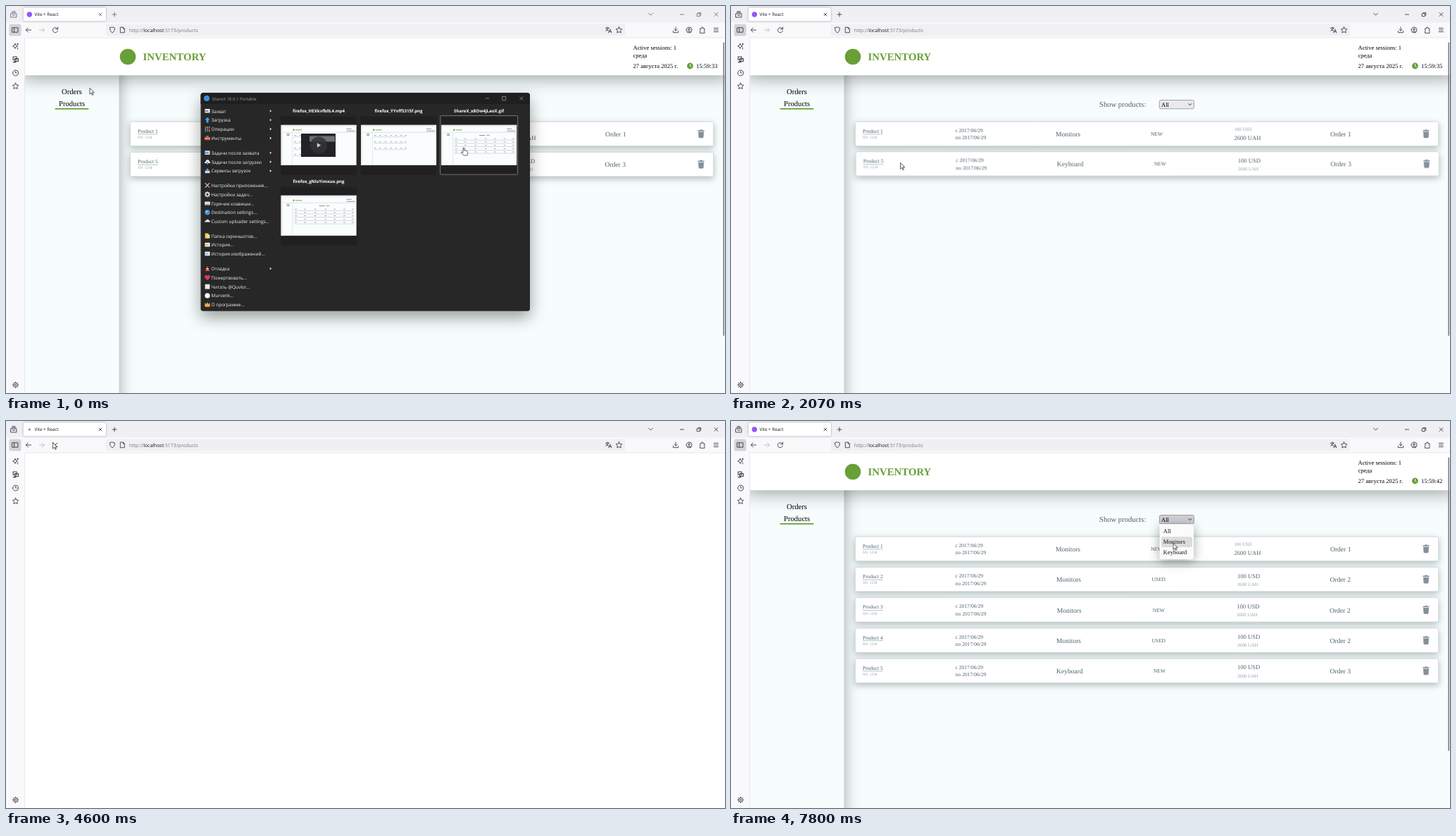
An HTML page that plays this animation: 1021x549 px, repeating every 8000 ms.

```html
<!DOCTYPE html>
<html lang="en">
<head>
<meta charset="utf-8">
<title>Inventory products</title>
<style>
html, body { margin: 0; width: 100%; height: 100%; overflow: hidden; background: #fff; }
svg { display: block; width: 100%; height: 100%; }
text { text-rendering: geometricPrecision; white-space: pre; }
.serif { font-family: "Liberation Serif", "Times New Roman", serif; }
.sans { font-family: "Open Sans", "Noto Sans", sans-serif; }
.line { fill: none; stroke: #3d3c46; stroke-width: .9; stroke-linecap: round; stroke-linejoin: round; }
.header { filter: drop-shadow(0 2px 14px rgba(0,0,0,.42)); }
.nav { filter: drop-shadow(2px 0 10px rgba(0,0,0,.3)); }
.card { filter: drop-shadow(0 3px 5px rgba(60,75,75,.36)); }
.popup { filter: drop-shadow(0 3px 8px rgba(0,0,0,.35)); }
.window { filter: drop-shadow(0 9px 11px rgba(0,0,0,.38)); }
.tab { filter: drop-shadow(0 0 1.2px rgba(0,0,0,.4)); }

/* one shared 8 s timeline: 1% = 80 ms */
.a { animation: 8s linear infinite; }
.step { animation-timing-function: step-end; }

#cursor { animation-name: cursor; animation-timing-function: ease-in-out; }
@keyframes cursor {
  0%, .2% { transform: translate(118.5px, 116px); }
  3.375%, 6% { transform: translate(266px, 145px); }
  16.625%, 20.5% { transform: translate(680px, 135px); }
  25.9%, 30.4% { transform: translate(240px, 222px); }
  34.1% { transform: translate(183px, 205px); }
  35% { transform: translate(177.5px, 172px); }
  38%, 41% { transform: translate(192px, 182px); }
  46.625% { transform: translate(89.8px, 57px); }
  50%, 64.4% { transform: translate(66px, 30px); }
  67.5%, 70.1% { transform: translate(303px, 152px); }
  70.875% { transform: translate(358.3px, 149px); }
  72.5%, 75.2% { transform: translate(559px, 146px); }
  80%, 89.4% { transform: translate(625px, 138px); }
  97.5%, 100% { transform: translate(627.5px, 173px); }
}
#window { animation-name: minimize; }
@keyframes minimize {
  0%, 18.6% { transform: none; opacity: 1; animation-timing-function: ease-in; }
  19.95%, 20.82% { transform: translate(305.4px, 272.4px) scale(.505); opacity: 1; }
  20.83%, 100% { transform: translate(305.4px, 272.4px) scale(.505); opacity: 0; }
}
#strip { animation-name: focus; }
@keyframes focus { 0% { opacity: .72; } 19.125%, 100% { opacity: 1; } }

#first { animation-name: first; animation-timing-function: ease; }
@keyframes first {
  0%, 22.9% { transform: none; }
  24.4% { transform: translate(.8px, -.8px); }
  26.5%, 34.4% { transform: none; }
  38.1%, 41.7% { transform: translate(2px, -2px); }
  45.4%, 100% { transform: none; }
}
#last { animation-name: last; animation-timing-function: ease; }
@keyframes last {
  0%, 25% { transform: none; }
  29%, 34.4% { transform: translate(2px, -2px); }
  38.1%, 100% { transform: none; }
}
#before { animation-name: before; }
@keyframes before { 0% { opacity: 1; } 57.5%, 100% { opacity: 0; } }
#after { animation-name: after; }
@keyframes after { 0% { opacity: 0; } 58.375%, 100% { opacity: 1; } }
#blank { animation-name: blank; }
@keyframes blank { 0% { opacity: 0; } 57.5% { opacity: 1; } 58.375%, 100% { opacity: 0; } }

.idle { animation-name: idle; }
.busy { animation-name: busy; }
@keyframes idle { 0% { opacity: 1; } 55.875% { opacity: 0; } 60%, 100% { opacity: 1; } }
@keyframes busy { 0% { opacity: 0; } 55.875% { opacity: 1; } 60%, 100% { opacity: 0; } }
#reload { animation-name: reload; }
@keyframes reload {
  0% { fill: transparent; }
  49.1% { fill: #e0e0e6; }
  52.5% { fill: #cdcdd5; }
  55.875%, 100% { fill: transparent; }
}
#select { animation-name: select; }
@keyframes select {
  0% { fill: #e9e9ed; }
  78% { fill: #d0d0d7; }
  83.375% { fill: #b1b1b9; }
  86.625%, 100% { fill: #d0d0d7; }
}
#popup { animation-name: popup; }
@keyframes popup { 0% { opacity: 0; } 83.375%, 100% { opacity: 1; } }
#mark { animation-name: mark; }
@keyframes mark { 0% { transform: translateY(-15.2px); } 95%, 100% { transform: none; } }

#ticks { animation-name: ticks; }
@keyframes ticks {
  0% { transform: none; }
  2.5% { transform: translateY(-20px); }
  15% { transform: translateY(-40px); }
  27.5% { transform: translateY(-60px); }
  40% { transform: translateY(-80px); }
  52.5% { transform: translateY(-100px); }
  58.375% { transform: translateY(-120px); }
  70.875% { transform: translateY(-140px); }
  83.375% { transform: translateY(-160px); }
  95.875%, 100% { transform: translateY(-180px); }
}
</style>
</head>
<body>
<svg id="stage" viewBox="0 0 1021 549" preserveAspectRatio="none"></svg>
<script>
const GREEN = '#689f38', SLATE = '#4e626c', PALE = '#8fa2ab';

const text = (x, y, size, fill, str, more = '') =>
  `<text x="${x}" y="${y}" font-size="${size}" fill="${fill}" ${more}>${str}</text>`;
const rect = (x, y, w, h, fill, more = '') =>
  `<rect x="${x}" y="${y}" width="${w}" height="${h}" fill="${fill}" ${more}/>`;
const dot = (x, y, r, fill, more = '') =>
  `<circle cx="${x}" cy="${y}" r="${r}" fill="${fill}" ${more}/>`;
const line = (d, more = '') => `<path class="line" d="${d}" ${more}/>`;
const at = (x, y, body, more = '') => `<g transform="translate(${x} ${y})" ${more}>${body}</g>`;

// ---- page ----
const trash = `<path fill="#84919a" d="M-4.6-5.2h2.6l.8-.9h2.4l.8.9h2.6v1.5h-9.2zM-4-2.9h8l-.5 7.6q-.1 1.1-1.1 1.1h-4.8q-1 0-1.1-1.1z"/>`;

// x positions: date, type, state, price, order
function card(n, slot, type, state, order, xs, id = '') {
  const [date, kind, cond, price, ord] = xs;
  const y = 164.2 + slot * 43.25;
  const prices = n === 1
    ? text(price, 13, 6.75, PALE, '100 USD') + text(price, 26, 8.6, SLATE, '2600 UAH')
    : text(price, 15.2, 8.6, SLATE, '100 USD') + text(price, 26.4, 6.65, PALE, '2600 UAH');
  return at(0, y, `<g ${id && `id="${id}" class="a"`}>
    ${rect(176.5, 0, 828, 34.3, '#fff', 'rx="2" class="card" stroke="#ccd8db" stroke-width=".8"')}
    ${text(187, 15.8, 7.45, SLATE, 'Product ' + n)}
    ${rect(187, 17.4, 28.8, .6, '#8a9aa2')}
    ${text(187, 24, 5.4, PALE, 'SN: 1234')}
    ${text(date, 14.7, 7.5, SLATE, 'с 2017/06/29')}
    ${text(date, 25.1, 7.5, SLATE, 'по 2017/06/29')}
    ${text(kind, 20.9, 9.57, SLATE, type)}
    ${text(cond, 20, 7.45, SLATE, state)}
    ${prices}
    ${text(ord, 20.9, 9.57, SLATE, 'Order ' + order)}
    ${at(987, 17.2, trash)}</g>`);
}
const xsFirst = [318.4, 461, 596, 714.4, 851];
const xsMid = [318.6, 462, 597.4, 719, 850.5];
const xsThird = [318.8, 462.7, 598.8, 718.2, 850];
const xsLast = [318.6, 462, 600, 719, 850.5];
const before = card(1, 0, 'Monitors', 'NEW', 1, xsFirst, 'first') + card(5, 1, 'Keyboard', 'NEW', 3, xsLast, 'last');
const after = card(1, 0, 'Monitors', 'NEW', 1, xsFirst) + card(2, 1, 'Monitors', 'USED', 2, xsMid) +
  card(3, 2, 'Monitors', 'NEW', 2, xsThird) + card(4, 3, 'Monitors', 'USED', 2, xsMid) +
  card(5, 4, 'Keyboard', 'NEW', 3, xsLast);

const clock = Array.from({ length: 10 }, (_, i) =>
  text(0, 10 + i * 20, 8.51, '#000', '15:59:' + (33 + i))).join('');

const page = `<g class="serif">
  ${rect(27, 45, 994, 504, '#f6fdfc')}
  ${rect(27, 45, 133.5, 520, '#f6fdfc', 'class="nav"')}
  ${text(79, 124.6, 10.64, '#000', 'Orders')}
  ${text(75, 142.3, 10.64, '#000', 'Products')}
  ${rect(69.5, 145, 48, 1.8, GREEN, 'rx=".9"')}
  ${text(523, 143.3, 10.64, SLATE, 'Show products:')}
  ${rect(608.4, 133.5, 49, 12.3, '#e9e9ed', 'id="select" class="a step" rx="2" stroke="#8f8f9d" stroke-width=".8"')}
  ${text(611, 142.6, 8.6, '#000', 'All')}
  ${line('M649.8 138.7l2 2 2-2', 'style="stroke:#111"')}
  <g id="before" class="a step">${before}</g>
  <g id="after" class="a step">${after}</g>
  ${rect(20, 35, 1010, 63.3, '#fff', 'class="header"')}
  ${dot(173, 72, 11.3, GREEN)}
  ${text(194.6, 77, 14.8, GREEN, 'INVENTORY', 'font-weight="700"')}
  ${text(890.6, 62, 8.51, '#000', 'Active sessions: 1')}
  ${text(890.6, 72.8, 8.51, '#000', 'среда')}
  ${text(890.6, 88, 8.51, '#000', '27 августа 2025 г.')}
  ${dot(971.4, 85, 4.4, GREEN)}
  ${line('M971.4 82.4v2.8l1.8 1', 'style="stroke:#fff"')}
  <svg x="980" y="78" width="36" height="14" overflow="hidden"><g id="ticks" class="a step">${clock}</g></svg>
  ${rect(1018.3, 51.5, 1.8, 416.5, '#85858b', 'rx=".9"')}
  <g id="popup" class="a step">
    ${rect(608.6, 146.3, 48.4, 50, '#fbfbfc', 'rx="3" class="popup"')}
    ${rect(611, 164.2, 44, 14.8, '#dcdcdf', 'id="mark" class="a step" rx="2"')}
    ${text(613.8, 159, 8.51, '#111', 'All')}
    ${text(613.8, 174.2, 8.51, '#111', 'Monitors')}
    ${text(613.8, 189.2, 8.51, '#111', 'Keyboard')}
  </g>
  ${rect(27, 45, 994, 504, '#fff', 'id="blank" class="a step"')}
</g>`;

// ---- browser frame ----
const star = 'M0-4.3l1.3 2.8 3 .4-2.2 2.1.6 3L0 2.6-2.7 4l.6-3-2.2-2.1 3-.4z';
const clockIcon = 'M-4 0a4 4 0 1 0 8 0a4 4 0 1 0-8 0M0-2.3V0h1.6';
const spokes = Array.from({ length: 8 }, (_, i) => {
  const a = i * Math.PI / 4, c = Math.cos(a), s = Math.sin(a);
  return `M${3 * c} ${3 * s}L${4.2 * c} ${4.2 * s}`;
}).join('');
const icon = (x, y, d, more) => at(x, y, line(d, more));

const chrome = `<g class="sans">
  ${rect(0, 0, 1021, 24, '#f0f0f4')}
  ${rect(0, 23.5, 1021, 21.7, '#f9f9fb')}
  ${rect(0, 45, 27, 504, '#f9f9fb')}
  ${rect(26.4, 45, .6, 504, '#dcdce0')}
  ${rect(27, 44.7, 994, .6, '#dcdce0')}
  ${rect(24.6, 2.2, 117.4, 19.4, '#fff', 'rx="2.4" class="tab"')}
  ${dot(33.3, 12, 3.7, '#9556f5', 'class="a step idle"')}
  ${dot(33.3, 12, 1.6, '#8a8a94', 'class="a step busy"')}
  ${text(40.4, 14.3, 6.3, '#15141a', 'Vite + React')}
  <g id="strip" class="a step">
    ${icon(11, 12, 'M-4-1h8v5h-8zM-3-2.7h6M-2-4.3h4M-1.3 1.4h2.6')}
    ${icon(134, 12, 'M-1.9-1.9l3.8 3.8M1.9-1.9l-3.8 3.8')}
    ${icon(154, 12, 'M-3 0h6M0-3v6')}
    ${icon(915.5, 11.5, 'M-3-1.4l3 3 3-3')}
    ${icon(960, 12, 'M-2.6 0h5.2')}
    ${icon(984, 12, 'M-2.5-1.2h3.8v3.8h-3.8zM-1.1-2.5h3.8v3.8')}
    ${icon(1008.5, 12, 'M-2.5-2.5l5 5M2.5-2.5l-5 5')}
  </g>
  ${rect(4.5, 25.8, 17, 16.6, '#d2d2d8', 'rx="2.2"')}
  ${icon(13, 34, 'M-4-3.2h8v6.4h-8zM-1.4-3.2v6.4')}
  ${icon(32, 34, 'M3.6 0h-7.2M-.6-3.1L-3.7 0l3.1 3.1')}
  ${icon(51, 34, 'M-3.6 0h7.2M.6-3.1L3.7 0 .6 3.1', 'style="stroke:#bdbdc4"')}
  ${rect(61.5, 25.8, 17, 16.6, 'transparent', 'id="reload" class="a step" rx="2.2"')}
  <g class="a step idle">${icon(70, 34, 'M3.3-1.3a3.6 3.6 0 1 0 .2 2.5M3.6-4v2.9h-2.9')}</g>
  <g class="a step busy">${icon(70, 34, 'M-3-3l6 6M3-3l-6 6')}</g>
  ${rect(142, 25.8, 737, 16.6, '#f0f0f4', 'rx="2.2"')}
  ${icon(151, 34, 'M0-4l3.6 1.2q0 5-3.6 7q-3.600-2-3.600-7z')}
  ${icon(165.5, 34, 'M-2.8-3.800h3.600l2 2v5.600h-5.600zM.8-3.800v2h2')}
  ${text(175, 36.8, 6.9, '#76757f', 'http://<tspan fill="#15141a">localhost</tspan>:5173/products')}
  ${icon(855.5, 34, 'M-4-2.800h5M-1.500-4v1.200M.2-2.800q-1 3-4 4.200M-3-1.500q1 2 3 2.700M.3 4l2-5 2 5M1 2.500h2.600')}
  ${icon(870.5, 34, star)}
  ${icon(951, 34, 'M0-4v5M-2.200-1L0 1.200 2.200-1M-3.600 1.500v2.200h7.200v-2.200')}
  ${icon(970, 34, 'M-4 0a4 4 0 1 0 8 0a4 4 0 1 0-8 0M-1.300-.9a1.300 1.300 0 1 0 2.600 0a1.300 1.300 0 1 0-2.600 0M-2.500 2.900q2.500-2.500 5 0')}
  ${icon(989, 34, 'M-3.500 4v-2.200q1.800-.8 0-2v-1.800h2.200q-.6-2.200 1-2.200t1 2.200h2.300v2.200q-2 .6 0 2.200v1.600z')}
  ${icon(1008.3, 34, 'M-3-2.600h6M-3 0h6M-3 2.600h6')}
  ${icon(13.6, 57, 'M-.6-3.400q.5 2.900 3.400 3.400q-2.900.5-3.400 3.400q-.5-2.900-3.400-3.400q2.900-.5 3.400-3.400M3-4v2M2-3h2M3 2.200v1.800')}
  ${icon(13.6, 76, 'M-3.500-4h5v4.200h-5zM-1-1.500h4.800v4h-4.800zM-3.500 3.600h4', 'style="stroke-width:1.1"')}
  ${icon(13.6, 95, clockIcon)}
  ${icon(13.6, 113.5, star)}
  ${icon(13.6, 537.5, 'M-3 0a3 3 0 1 0 6 0a3 3 0 1 0-6 0M-1.100 0a1.100 1.100 0 1 0 2.200 0a1.100 1.100 0 1 0-2.200 0' + spokes)}
</g>`;

// ---- capture tool window ----
const box = (c, c2 = '#eee') => rect(-3.6, -3, 7.2, 5.6, c2, 'rx=".6"') + rect(-3.600, -1, 5, 2, c);
const glyph = {
  shot: box('#7b8ca3'),
  up: '<path fill="#4aa3ee" d="M0-4l3.600 3.800h-2.100v4h-3v-4h-2.100z"/>',
  grid: [-2.7, 0, 2.7].map((y, r) => [-2.7, 0, 2.7].map((x, c) =>
    rect(x - .9, y - .9, 1.8, 1.8, ['#e25b4a', '#7fc65a', '#5aa7e8'][(r + c) % 3])).join('')).join(''),
  tools: rect(-4, -1.6, 8, 4.4, '#d8433b', 'rx=".8"') + rect(-1.6, -3, 3.2, 1.2, '#bbb') + rect(-4, .2, 8, .8, '#eee'),
  after: box('#4a93d9', '#cfd9e4'),
  cloud: '<path fill="#e6e9ee" d="M-4 1.800q-.2-2 1.600-2.400q.5-2.600 2.800-2.400q2 .1 2.300 2.200q1.600.4 1.400 2.600z"/>' + rect(-1, 0, 2, 3.4, '#58a5e6'),
  host: rect(-3.4, .2, 6.8, 3, '#d7dde5') + '<path fill="#4aa3ee" d="M0-4l3 4h-6z"/>',
  cross: '<path stroke="#ccc" stroke-width="1.200" d="M-3.200-3.200l6.400 6.400M3.200-3.200l-6.400 6.400"/>' + rect(1.6, 1.6, 2, 2, '#d8433b'),
  gear: `<path stroke="#ddd" stroke-width="1.300" d="${spokes}"/><circle r="2.300" fill="none" stroke="#ddd" stroke-width="1.600"/>`,
  keys: rect(-3.8, -2.6, 7.6, 5.2, '#e4e4e4', 'rx=".8"') + rect(-2.4, .8, 4.8, 1, '#888'),
  globe: dot(0, 0, 3.7, '#3f93dc') + dot(-1, -1, 1.3, '#9fd0f5'),
  puff: '<path fill="#e6e9ee" d="M-4 1q0-2 1.800-2.200q1-2 2.800-1.600q1.600.3 1.800 1.800q1.800.2 1.600 2z"/>',
  folder: rect(-3.4, -3.6, 5, 7.2, '#f0c95a') + rect(-.6, -1.6, 4, 5, '#f6dd8d'),
  hist: box('#e0b64c', '#f3efe2'),
  pics: box('#8db8dc', '#eeeeee'),
  cone: '<path fill="#e2553d" d="M0-4l3 7.600h-6z"/>' + rect(-1.7, -.4, 3.4, 1.1, '#fff'),
  heart: '<path fill="#e03a4e" d="M0 3.600q-4-3-4-5q.2-2.200 2.200-2.200q1.200 0 1.800 1.200q.6-1.200 1.800-1.200q2 0 2.200 2.200q0 2-4 5z"/>',
  square: rect(-3.4, -3.4, 6.8, 6.8, '#e8e8e8'),
  disc: dot(0, 0, 3.6, '#fff'),
  crown: '<path fill="#edb23e" d="M-3.600-2.600l2 1.800 1.600-2.600 1.600 2.600 2-1.800v5.600h-7.200z"/>',
};
const groups = [
  [149, ['shot', 'Захват', 1], ['up', 'Загрузка', 1], ['grid', 'Операции', 1], ['tools', 'Инструменты', 1]],
  [208.3, ['after', 'Задачи после захвата', 1], ['cloud', 'Задачи после загрузки', 1], ['host', 'Сервисы загрузок', 1]],
  [254.4, ['cross', 'Настройки приложения...'], ['gear', 'Настройки задач...'], ['keys', 'Горячие клавиши...'],
    ['globe', 'Destination settings...'], ['puff', 'Custom uploader settings...']],
  [326, ['folder', 'Папка скриншотов...'], ['hist', 'История...'], ['pics', 'История изображений...']],
  [372.5, ['cone', 'Отладка', 1], ['heart', 'Пожертвовать...'], ['square', 'Читать @Quvlor...'],
    ['disc', 'Murvenk...'], ['crown', 'О программе...']],
];
const menu = groups.map(([top, ...items]) => items.map(([g, label, sub], i) =>
  at(286, top + i * 12.8, glyph[g] + text(5.6, 2.5, 6.45, '#f2f2f2', label) +
    (sub ? '<path fill="#eee" d="M88.800-1.800l2.300 1.800-2.300 1.800z"/>' : ''))).join('')).join('');

function thumb(x, y, name, rows, wide) {
  let s = rect(x - 54, y + 8, 108, 83, '#202020') +
    text(x, y + 2.3, 6.15, '#fff', name, 'text-anchor="middle" font-weight="700"');
  let p = rect(0, 0, 107, 57, '#fafdfd') + rect(0, 0, 107, 2.4, '#ececf1') + rect(0, 2.4, 2.6, 54.6, '#f1f1f4') +
    rect(3, 10, 104, .7, '#cfd5d5') + rect(15.8, 10, .7, 47, '#d6dcdc') +
    dot(18, 7, 1.2, GREEN) + rect(20.5, 6.3, 9, 1.4, '#9dbf7e') +
    rect(93, 5, 7, .8, '#777') + rect(93, 8, 12, .8, '#777') + rect(8, 12.4, 4, .8, '#666') + rect(8, 14.4, 4, .8, '#666');
  if (wide) p += rect(54, 14.3, 8, .9, '#888') + rect(64, 13.8, 5, 1.6, '#bbb');
  for (let i = 0; i < rows; i++) {
    const ry = (wide ? 17.5 : 13) + i * (wide ? 4.7 : 9), w = wide ? 86 : 46;
    p += rect(18, ry + 3.6, w, .7, '#c3caca');
    for (const k of [.02, .17, .34, .51, .66, .82, .96]) p += rect(18 + w * k, ry + 1.4, 2.6, .9, '#9aa5a8');
  }
  return s + at(x - 53.4, y + 20, p);
}
const hand = '<path fill="#fff" stroke="#222" stroke-width=".7" stroke-linejoin="round" d="M-1.500-5q1.400-1 1.700.4v3l4 .9q1.200.4 1 1.800l-.8 4.400h-4.800l-3.600-4q-.2-1.400 1.200-1l1.300 1z"/>';

const tool = `<g id="window" class="a"><g class="sans">
  ${rect(276.5, 123.3, 467.5, 309.5, '#272727', 'rx="3.500" class="window"')}
  <path fill="#1f1f1f" d="M276.500 139v-12.200q0-3.500 3.500-3.500h460.500q3.500 0 3.500 3.500v12.200z"/>
  ${dot(285, 131, 4, '#3f8fd8')}
  ${text(292.4, 133.5, 6, '#9a9a9a', 'ShareX 18.0.1 Portable')}
  <path fill="none" stroke="#a2a2a2" stroke-width=".7" d="M680.800 131h5.400M704.600 128.500h5.200v5.200h-5.200zM729.400 128.600l5 5M734.400 128.600l-5 5"/>
  ${menu}
  ${thumb(444, 148.800, 'firefox_HEXkvfb0L4.mp4', 4, false)}
  ${rect(419, 181, 49, 33, '#232327')}${rect(431, 184.5, 36, 8, '#6d7075')}
  ${dot(444, 197.5, 12, '#333', 'fill-opacity=".85"')}
  <path fill="#ccc" d="M441.800 194.300l5.400 3.200-5.400 3.200z"/>
  ${thumb(557.5, 148.800, 'firefox_YYvff5315f.png', 3, false)}
  ${thumb(671.6, 148.800, 'ShareX_x8Ow4jLaoX.gif', 5, true)}
  ${rect(616.7, 155.600, 110, 83.500, 'none', 'rx="1.500" stroke="#8a8a8a" stroke-width=".8"')}
  ${at(650.5, 206.500, hand)}
  ${thumb(444, 248.800, 'firefox_gNloYimxuo.png', 5, true)}
</g></g>`;

const cursor = `<g id="cursor" class="a"><path fill="#fff" stroke="#1a1a1a" stroke-width=".75" stroke-linejoin="round"
  d="M.4.4v8.800l2.100-1.900 1.500 3.200 1.400-.7-1.500-3h2.900z"/></g>`;

document.getElementById('stage').innerHTML = page + chrome + tool + cursor;
</script>
</body>
</html>
```
